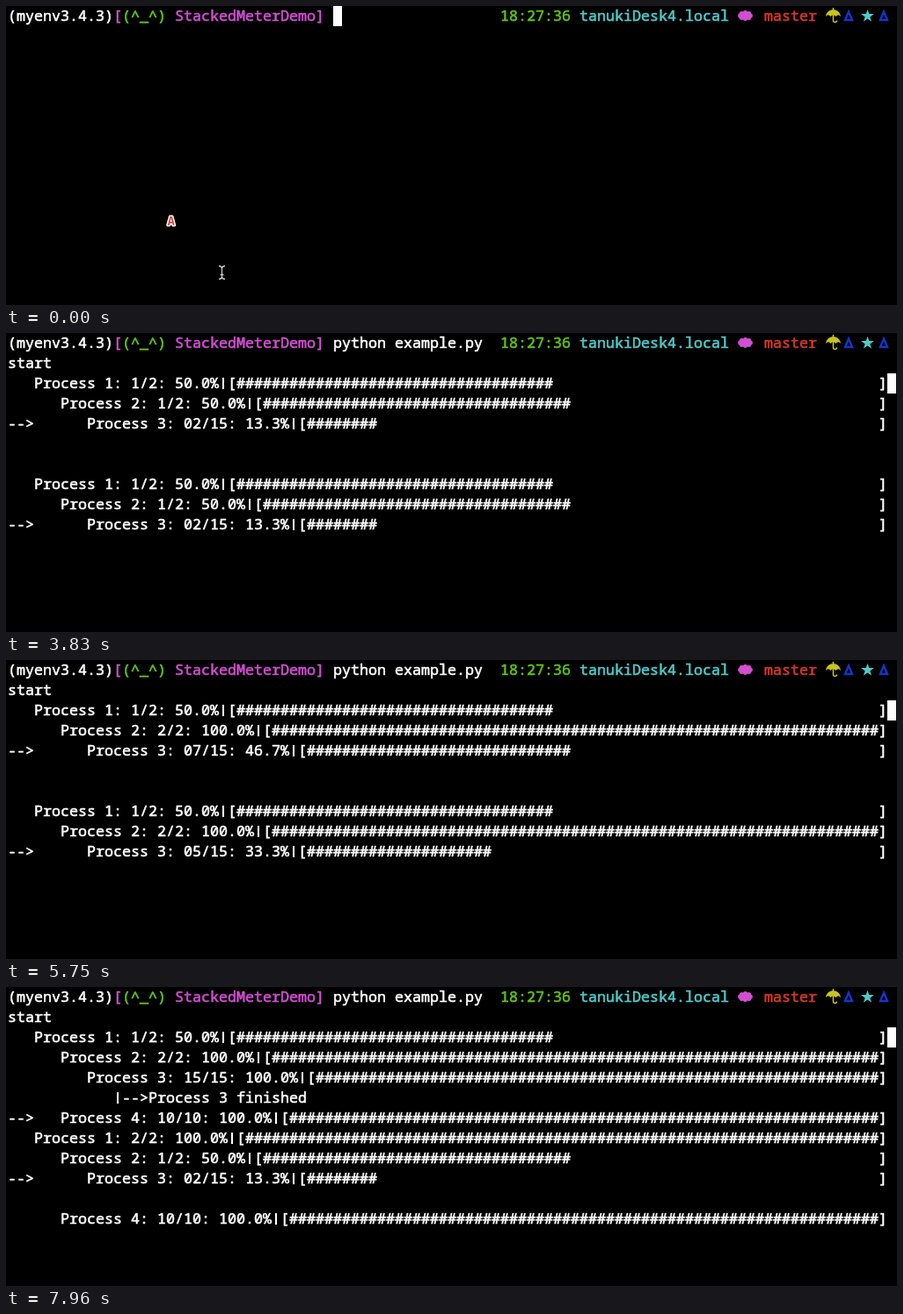
An HTML page with a canvas that plays this animation: 1013 px wide and 341 px high, repeating every 8 s.

```html
<!DOCTYPE html>
<html lang="en">
<head>
<meta charset="utf-8">
<title>Terminal progress bars</title>
<style>
  html, body { margin: 0; width: 100%; height: 100%; overflow: hidden; background: #000; }
  canvas { display: block; width: 1013px; height: 341px; }
</style>
</head>
<body>
<canvas id="stage" width="1013" height="341"></canvas>
<script>
const ctx = document.getElementById('stage').getContext('2d');
const LOOP = 8000, CELL = 10, LINE = 23, LEFT = 2, BASELINE = 17;
const ENTER = 2930, START = 3680, LATE = 7210;
const WHITE = '#fff', GREEN = '#5fc414', MAGENTA = '#d24fd2', CYAN = '#4fcaca',
      RED = '#d23a28', YELLOW = '#c8c320', BLUE = '#1436c8';
const FONT = '500 16.67px "Noto Sans Mono", "DejaVu Sans Mono", monospace';

const typing = [
  [0, ''], [870, 'p'], [1020, 'py'], [1160, 'pyth'], [1310, 'pytho'], [1450, 'pythom'],
  [1900, 'pytho'], [2045, 'python'], [2190, 'python '], [2340, 'python e'],
  [2630, 'python example.py ']
];

// [refresh step, counter value]
const upperInner = [[0, 1], [10, 15], [11, 2], [14, 7], [21, 15]];
const lowerInner = [[0, 1], [10, 15], [11, 1], [14, 5], [20, 15], [27, 15], [28, 1], [29, 2]];
const upperLast = [[22, 1], [29, 10]];
const lowerLast = [[21, 1], [27, 10]];

function valueAt(keys, step) {
  const next = keys.findIndex(key => key[0] >= step);
  if (next < 0) return keys[keys.length - 1][1];
  if (next === 0) return keys[0][1];
  const [a, from] = keys[next - 1], [b, to] = keys[next];
  return Math.round(from + (to - from) * (step - a) / (b - a));
}

function print(text, col, row, color = WHITE) {
  ctx.font = FONT;
  ctx.fillStyle = ctx.strokeStyle = color;
  ctx.lineWidth = 0.6;
  ctx.lineJoin = 'round';
  const y = row * LINE + BASELINE;
  [...text].forEach((char, i) => {
    const x = LEFT + (col + i) * CELL;
    if (char === '|') {
      ctx.fillRect(x + 4, y - 12, 2, 13);
    } else if (char !== ' ') {
      ctx.fillText(char, x, y);
      ctx.strokeText(char, x, y);
    }
  });
}

function cursor(col, row) {
  ctx.fillStyle = WHITE;
  ctx.fillRect(LEFT + col * CELL, row * LINE, CELL, LINE);
}

function polygon(points) {
  ctx.beginPath();
  points.forEach(([x, y]) => ctx.lineTo(x, y));
  ctx.closePath();
}

function triangle(x) {
  ctx.strokeStyle = BLUE;
  ctx.lineWidth = 2.4;
  ctx.lineJoin = 'miter';
  polygon([[x + 6, 6.5], [x + 10, 16], [x + 2, 16]]);
  ctx.stroke();
}

function star(x, y, radius) {
  ctx.fillStyle = CYAN;
  polygon(Array.from({ length: 10 }, (_, i) => {
    const r = i % 2 ? radius * 0.39 : radius, a = (i / 5 - 0.5) * Math.PI;
    return [x + r * Math.cos(a), y + r * Math.sin(a)];
  }));
  ctx.fill();
}

function cloud(x, y) {
  ctx.fillStyle = MAGENTA;
  ctx.beginPath();
  ctx.ellipse(x, y, 6.5, 4.5, 0, 0, Math.PI * 2);
  ctx.fill();
  for (let i = 0; i < 8; i++) {
    const a = i * Math.PI / 4;
    ctx.beginPath();
    ctx.arc(x + 5.8 * Math.cos(a), y + 3.3 * Math.sin(a), 2.6, 0, Math.PI * 2);
    ctx.fill();
  }
}

function umbrella() {
  ctx.fillStyle = ctx.strokeStyle = YELLOW;
  ctx.beginPath();
  ctx.moveTo(932, 12);
  ctx.bezierCurveTo(933, 1.5, 948, 1.5, 949, 12);
  for (const x of [943.5, 937.5, 932]) ctx.quadraticCurveTo(x + 2.8, 8.5, x, 12);
  ctx.fill();
  ctx.lineWidth = 1.5;
  ctx.beginPath();
  ctx.moveTo(940.5, 2);
  ctx.lineTo(940.5, 16.5);
  ctx.arc(942.5, 16.5, 2, Math.PI, 0, true);
  ctx.stroke();
}

function prompt() {
  print('(myenv3.4.3)', 0, 0);
  print('[', 12, 0, MAGENTA);
  print('(^_^)', 13, 0, GREEN);
  print('StackedMeterDemo]', 19, 0, MAGENTA);
  print('18:27:36', 56, 0, GREEN);
  print('tanukiDesk4.local', 65, 0, CYAN);
  print('master', 86, 0, RED);
  cloud(840.5, 11);
  umbrella();
  triangle(952);
  star(979.5, 11.5, 7.8);
  triangle(992);
}

function pointer() {
  ctx.font = 'bold 14px "DejaVu Sans Mono", monospace';
  ctx.lineJoin = 'round';
  ctx.strokeStyle = WHITE;
  ctx.lineWidth = 3;
  ctx.strokeText('A', 183.5, 250);
  ctx.fillStyle = '#d8453c';
  ctx.fillText('A', 183.5, 250);
  ctx.strokeStyle = '#ccc';
  ctx.lineWidth = 1.3;
  ctx.beginPath();
  for (const [edge, inner] of [[296.5, 299], [311.5, 309]]) {
    ctx.moveTo(242, edge);
    ctx.quadraticCurveTo(245, edge, 245.5, inner);
    ctx.quadraticCurveTo(246, edge, 249, edge);
  }
  ctx.moveTo(245.5, 298);
  ctx.lineTo(245.5, 310);
  ctx.moveTo(243.5, 306.5);
  ctx.lineTo(247.5, 306.5);
  ctx.stroke();
}

function bar(row, indent, id, done, total, active) {
  const count = String(done).padStart(String(total).length, '0');
  const percent = (100 * done / total).toFixed(1);
  const label = `Process ${id}: ${count}/${total}: ${percent}%|[`;
  const begin = indent + label.length;
  if (active) print('-->', 0, row);
  print(label, indent, row);
  print('#'.repeat(Math.floor((99 - begin) * done / total)), begin, row);
  print(']', 99, row);
}

function group(row, step, innerKeys, lastKeys, restart) {
  const lastStarted = step >= lastKeys[0][0];
  const again = step >= restart;
  const lastActive = lastStarted && !again;
  bar(row, 3, 1, again ? 2 : 1, 2);
  bar(row + 1, 6, 2, step > 10 && !again ? 2 : 1, 2);
  bar(row + 2, 9, 3, valueAt(innerKeys, step), 15, !lastActive);
  if (lastActive) print('|-->Process 3 finished', 12, row + 3);
  if (lastStarted) bar(row + 4, 6, 4, valueAt(lastKeys, step), 10, lastActive);
}

function draw(t) {
  ctx.fillStyle = '#000';
  ctx.fillRect(0, 0, 1013, 341);
  prompt();
  const typed = typing.filter(([time]) => time <= t).pop()[1];
  print(typed, 37, 0);
  if (t < 120) pointer();
  if (t < ENTER) {
    cursor(37 + typed.length, 0);
  } else if (t < START) {
    cursor(0, 1);
  } else {
    const step = t < LATE ? Math.floor((t - START) / 147) : 24 + Math.floor((t - LATE) / 150);
    print('start', 0, 1);
    group(2, step, upperInner, upperLast, Infinity);
    group(7, step, lowerInner, lowerLast, 28);
    cursor(100, 2);
  }
}

const origin = performance.now();
function frame() {
  draw((performance.now() - origin) % LOOP);
  requestAnimationFrame(frame);
}
frame();
</script>
</body>
</html>
```
